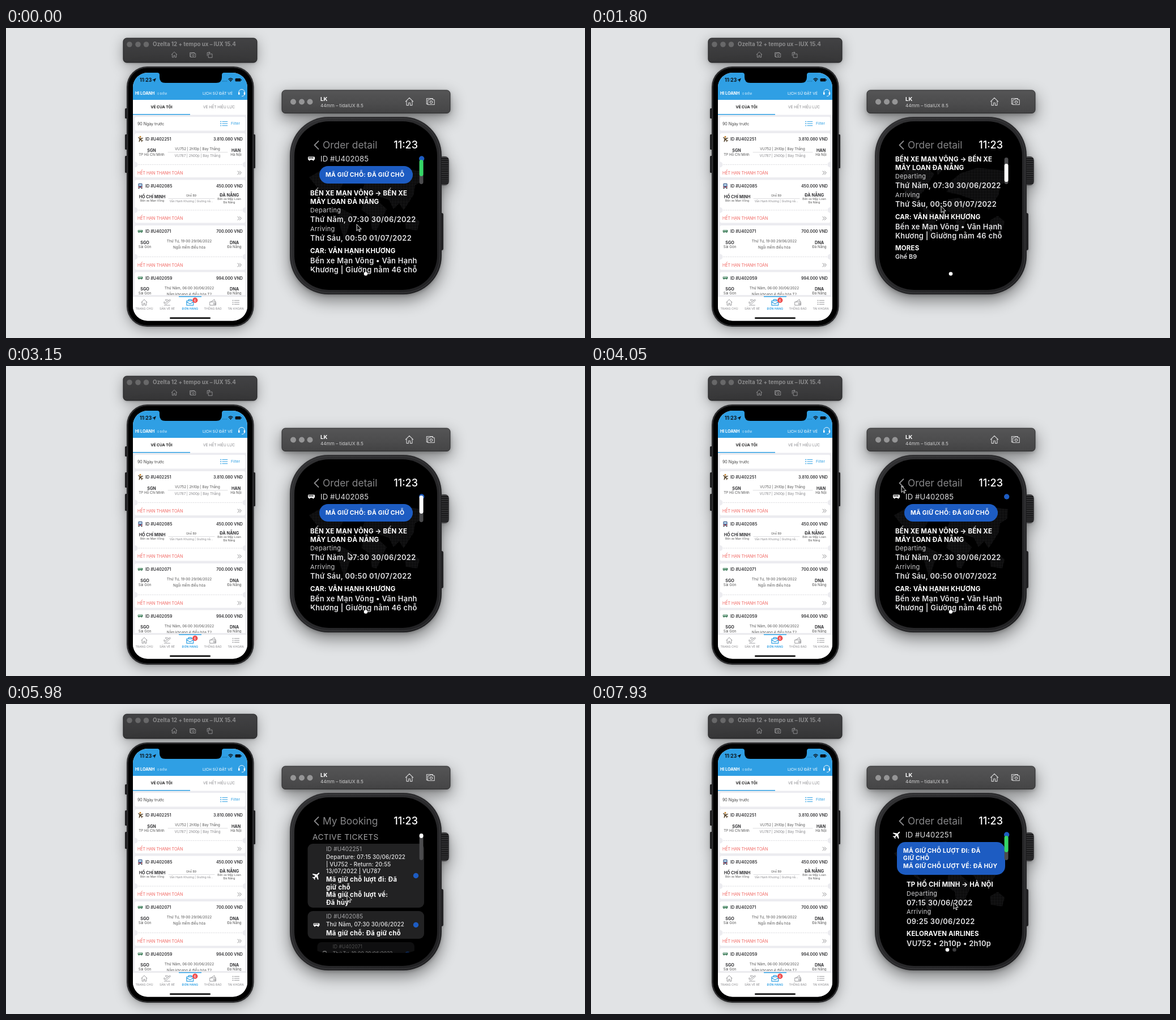
An HTML page that plays this animation: 1022x548 px, repeating every 8 s.

```html
<!DOCTYPE html>
<html lang="vi">
<head>
<meta charset="utf-8">
<title>Booking on phone and watch</title>
<style>
html, body { margin: 0; width: 100%; height: 100%; overflow: hidden; background: #e1e3e5; }
svg { display: block; width: 1022px; height: 548px; font-family: Inter, Roboto, sans-serif; }
.shade { filter: drop-shadow(0 1px 2px rgba(0, 0, 0, .18)) drop-shadow(0 5px 11px rgba(0, 0, 0, .32)); }
.deep { filter: drop-shadow(0 2px 3px rgba(0, 0, 0, .2)) drop-shadow(0 10px 14px rgba(0, 0, 0, .46)); }
.line { fill: none; stroke-linecap: round; stroke-linejoin: round; }
</style>
</head>
<body>
<svg id="stage" viewBox="0 0 1022 548"></svg>
<script>
const BLUE = '#2d9fe3', DEEP = '#1d5cc2', RED = '#f0615c', GREY = '#88888c', INK = '#333336', BG = '#ececf0';

// y is the middle of the capital letters
const text = (s, x, y, size, fill = '#fff', weight = 400, anchor = 'start', gap = 0) =>
  `<text x="${x}" y="${y + size * .36}" font-size="${size}" fill="${fill}" font-weight="${weight}" text-anchor="${anchor}" letter-spacing="${gap}">${s}</text>`;
const mid = (s, x, y, size, fill, weight) => text(s, x, y, size, fill, weight, 'middle');
const end = (s, x, y, size, fill, weight) => text(s, x, y, size, fill, weight, 'end');
const rect = (x, y, w, h, r, fill, more = '') =>
  `<rect x="${x}" y="${y}" width="${w}" height="${h}" rx="${r}" fill="${fill}" ${more}/>`;
const dot = (x, y, r, fill) => `<circle cx="${x}" cy="${y}" r="${r}" fill="${fill}"/>`;
const path = (d, fill) => `<path d="${d}" fill="${fill}"/>`;
const line = (d, stroke, w = 1, more = '') => `<path class="line" d="${d}" stroke="${stroke}" stroke-width="${w}" ${more}/>`;
const at = (x, y, s, inner, turn = 0) => `<g transform="translate(${x} ${y}) rotate(${turn}) scale(${s})">${inner}</g>`;
const group = (id, inner) => `<g id="${id}">${inner}</g>`;

const plane = c => path('M0-7C.8-7 1.1-6 1.1-5V-2L7 2V3.5L1.1 1.8V5L3 6.5V7.5L0 6.8-3 7.5V6.5L-1.1 5V1.8L-7 3.5V2L-1.1-2V-5C-1.1-6-.8-7 0-7Z', c);
const bus = (c, hole) => rect(-6, -3.4, 12, 5.4, 1.2, c) + [-4.8, -1.8, 1.2].map(x => rect(x, -2.3, 2.3, 1.8, .3, hole)).join('') +
  dot(-3.3, 2.2, 1.3, c) + dot(3.3, 2.2, 1.3, c);
const train = (c, hole) => rect(-4, -6, 8, 9, 2, c) + rect(-2.8, -4, 5.6, 3.4, .6, hole) +
  dot(-2, 1.2, .8, hole) + dot(2, 1.2, .8, hole) + line('M-2.5 3.5L-4.5 6M2.5 3.5L4.5 6M-3 4.8H3', c, 1.1);
const home = c => line('M-6 0L0-6 6 0M-4.5-1V6H-1.3V2H1.3V6H4.5V-1', c, 1);
const shots = c => line('M-4 4H-6V-5H4V-3M-4-3H-1L0-4.3H3L4-3H6.5V5H-4Z', c, 1) +
  `<circle cx="1.3" cy="1" r="2" fill="none" stroke="${c}"/>`;
const list = (c, w) => line('M-3-4H7M-3 0H7M-3 4H7', c, w) + [-4, 0, 4].map(y => dot(-6, y, 1, c)).join('');

// ---------- phone ----------
function ticket(top, h, id, price, icon, cut) {
  const y = top + 10.5;
  let s = rect(227.5, top, 195, h, 3, '#fff') + at(237, y, .72, icon) +
    text('ID #' + id, 246, y, 7.3, INK, 600) + end(price + ' VND', 418, y, 7.1, INK, 600);
  if (cut) s += line(`M234 ${cut}H417`, '#d8d8dc', .8, 'stroke-dasharray="2 2"') +
    dot(227.5, cut, 5, BG) + dot(422.5, cut, 5, BG) +
    text('HẾT HẠN THANH TOÁN', 232, cut + 14.7, 7.05, RED) +
    line(`M409 ${cut + 11.5}l3 3-3 3m3.3-6l3 3-3 3`, '#66666a', .8);
  return s;
}
const place = (code, name, x, y, size = 6.2) => mid(code, x, y, 7.2, INK, 700) + mid(name, x, y + 7.6, size, '#555');
const note = (s, x, y, size = 6.2, fill = '#555') => mid(s, x, y, size, fill);
const van = bus('#3d7a58', '#d6eedf');
const coach = rect(-5, -6, 10, 11, 2, '#3f5f8c') + rect(-3.5, -4, 7, 4, 1, '#bcd7ef') +
  dot(-3, 3, 1.5, RED) + dot(3, 3, 1.5, RED) + rect(-5, 5, 3, 2, .5, INK) + rect(2, 5, 3, 2, .5, INK);

const tickets =
  ticket(186, 78, 'U402251', '3.810.080', at(0, 0, 1, plane('#5b4a33') + dot(4, -4, 2.2, '#c98b3a'), -45), 241.5) +
  place('SGN', 'TP Hồ Chí Minh', 257, 216.3) + place('HAN', 'Hà Nội', 406, 216.3) +
  note('VU752 | 2h10p | Bay Thẳng', 338, 214) + note('VU787 | 2h00p | Bay Thẳng', 338, 225.5, 6.2, GREY) +
  line('M286 219.7H391', '#d5d5d9', .8) +
  ticket(268.5, 76, 'U402085', '450.000', coach, 322) +
  place('HỒ CHÍ MINH', 'Bến xe Mạn Vông', 258, 298, 5.1) + place('ĐÀ NẴNG', 'Bến xe Mây Loan', 394, 295, 5.1) +
  note('Đà Nẵng', 394, 308.5, 5.1) + note('Ghế B9', 327, 296.5, 5.2) +
  note('Vân Hạnh Khương | Giường nằ...', 327, 306.5, 5.1, GREY) + line('M287 301.5H368', '#d5d5d9', .8) +
  ticket(349, 78.5, 'U402071', '700.000', van, 404.5) +
  place('SGO', 'Sài Gòn', 245, 379) + place('DNA', 'Đà Nẵng', 403, 379) +
  note('Thứ Tư, 19:00 29/06/2022', 323.5, 377, 6.4) + note('Ngồi mềm điều hòa', 323.5, 388) +
  ticket(431.5, 60, 'U402059', '994.000', van) +
  place('SGO', 'Sài Gòn', 245, 461.5) + place('DNA', 'Đà Nẵng', 403, 461.5) +
  note('Thứ Năm, 06:00 30/06/2022', 323.5, 459.5, 6.4) + note('Nằm khoang 4 điều hòa T2', 323.5, 470.5);

const tabs = [
  ['TRANG CHỦ', home(GREY)],
  ['SĂN VÉ RẺ', line('M-6 6H6M-6-1L-3 1 6-6 7-4-2 4-6 2ZM0-2L-4-5-2-6 4-4', GREY, .9)],
  ['ĐƠN HÀNG', line('M-7-3H7V6H-7ZM-3-3V-6H3V-3M-7-1L0 3 7-1', BLUE, 1.4)],
  ['THÔNG BÁO', line('M-6-1H6V6H-6ZM-4-1L3-6 5-1M2 2H6V4H2Z', GREY, 1)],
  ['TÀI KHOẢN', list(GREY, 1)]
].map(([name, icon], i) => at(244 + i * 40.4, 485, .85, icon) +
  mid(name, 244 + i * 40.4, 496.5, 5.2, i == 2 ? BLUE : GREY, i == 2 ? 600 : 400)).join('');

const phone =
  `<g class="shade">${rect(207, 18, 236, 43, 6, 'url(#bar)', 'stroke="#1d1d1e"')}</g>` +
  [218, 233, 247.5].map(x => dot(x, 29, 4.8, '#686869')).join('') +
  text('Ozelta 12 + tempo ux – lUX 15.4', 259, 28.7, 9.7, '#8b8b8c', 700) +
  at(297, 47, .8, home('#a0a0a1')) + at(329.5, 47.5, .8, shots('#a0a0a1')) +
  at(360, 47.5, .8, line('M-3-2H5V6H-3ZM-6 2V-5H0M-2-7L0-5-2-3', '#a0a0a1', 1)) +
  `<g class="shade">${[[142, 18], [188, 27], [226, 30]].map(([y, h]) => rect(210, y, 6, h, 1.5, '#1e1e20')).join('') +
    rect(434, 188, 6, 60, 1.5, '#1e1e20') + rect(213, 68, 224.5, 460, 36, '#262628')}</g>` +
  rect(215, 70, 220.5, 456, 34, '#000', 'stroke="#3f3f42" stroke-width=".8"') +
  `<g clip-path="url(#phoneClip)">` +
    rect(224, 79, 202, 440, 0, BG) + rect(224, 79, 202, 48, 0, '#2f9fe4') +
    path('M267 79Q271 79 271 83V87Q271 97 281 97H371Q381 97 381 87V83Q381 79 385 79Z', '#000') +
    text('11:23', 236, 92, 8.6, '#0b1015', 700) + path('M258 92L265 88.5 262 96 261.3 92.7Z', '#0b1015') +
    [382, 384.5, 387, 389.5].map(x => dot(x, 94, .7, '#17669a')).join('') +
    line('M393 90.5Q396.5 87.5 400 90.5M394.5 92.3Q396.5 90.5 398.5 92.3', '#0b1015', 1.4) + dot(396.5, 94, 1, '#0b1015') +
    rect(404.5, 89, 10, 5.5, 1.5, '#0b1015') + rect(415, 90.7, 1, 2, .5, '#0b1015') +
    text('HI LOANH', 228, 115.5, 7.2, '#fff', 700) + text('0 ĐIỂM', 267, 116, 5, '#d9effc') +
    text('LỊCH SỬ ĐẶT VÉ', 347, 115.3, 6.8) +
    line('M411 115V113A5 4.5 0 0 1 421 113V117Q421 120.5 416.5 120.5', '#fff', .9) +
    rect(410, 113.5, 2.5, 4.5, 1, '#fff') + rect(419.7, 113.5, 2.5, 4.5, 1, '#fff') +
    rect(224, 127, 202, 26.5, 0, '#fff') + rect(224, 152, 101, 1.5, 0, BLUE) +
    mid('VÉ CỦA TÔI', 274.5, 140, 6.7, '#222', 700) + mid('VÉ HẾT HIỆU LỰC', 376, 140, 6.6, GREY) +
    rect(227.5, 157, 195, 24.5, 3, '#fff') + text('90 Ngày trước', 232, 169, 7, '#444') +
    at(384.5, 169, .9, list(BLUE, 1.1)) + text('Filter', 397, 169, 6.8, BLUE) +
    `<g clip-path="url(#ticketClip)">${tickets}</g>` +
    rect(224, 474, 202, 45, 0, '#fff') + line('M224 474.5H426', '#dedee2', .7) + rect(305, 474, 40, 1.5, 0, BLUE) + tabs +
    dot(333.7, 481.3, 4.7, '#ef4d4d') + mid('6', 333.7, 481.3, 6.2, '#fff') + rect(289, 511.5, 72, 2.6, 1.3, '#000') +
  `</g>`;

// ---------- watch ----------
const ridges = Array.from({ length: 14 }, (_, i) => line(`M769 ${231 + i * 3.3}H780`, '#0c0c0d', 1.5)).join('');
const watch =
  `<g class="deep">${rect(487, 110, 297, 40.5, 6, 'url(#bar2)', 'stroke="#2b2b2c"')}</g>` +
  [507, 522, 536.5].map(x => dot(x, 130.5, 5, '#959596')).join('') +
  text('LK', 555, 125.5, 9.6, '#fff', 700) + text('44mm – tidalUX 8.5', 555, 136.7, 8.2, '#d0d0d1') +
  at(712, 130, 1.1, home('#d4d4d5')) + at(749, 130, 1.1, shots('#d4d4d5')) +
  `<g class="deep">${rect(764, 227, 18, 51, 7, '#3a3a3c') + rect(764, 327, 8, 66, 3, '#222224')}
    ${rect(501, 157, 268, 314, 68, 'url(#case)')}</g>` + ridges +
  rect(504, 160, 262, 308, 65, 'none', 'stroke="#454547" stroke-width=".8"') + rect(509, 165, 252, 298, 61, '#000');

function row(h, id, icon, plain, bold, boldY) {
  const c = h / 2;
  return `<g class="row">${rect(-102.5, 0, 205.5, h, 9, '#222223') + at(-87, c, 1, icon) + dot(88.5, c, 4.7, DEEP)}` +
    text('ID #' + id, -70, 9.3, 10, '#a9a9ab', 400, 'start', .15) +
    plain.map((s, i) => text(s, -70, 23.8 + i * 12.2, 9.9, '#e6e6e7', 500, 'start', .1)).join('') +
    bold.map((s, i) => text(s, -70, boldY + i * 13.5, 11.2, '#fff', 700, 'start', .33)).join('') + '</g>';
}
const short = (id, icon, when) => row(49, id, icon, [when], ['Mã giữ chỗ: Đã giữ chỗ'], 39);
const tops = [247, 366, 421, 476, 531];
const rows =
  row(113, 'U402251', at(0, 0, 1, plane('#fff'), 45), ['Departure: 07:15 30/06/2022', '| VU752 - Return: 20:55', '13/07/2022 | VU787'],
    ['Mã giữ chỗ lượt đi: Đã', 'giữ chỗ', 'Mã giữ chỗ lượt về:', 'Đã hủy'], 63) +
  short('U402085', at(0, 0, .9, bus('#fff', '#222')), 'Thứ Năm, 07:30 30/06/2022') +
  short('U402071', train('#fff', '#222'), 'Thứ Tư, 19:00 29/06/2022') +
  short('U402059', train('#fff', '#222'), 'Thứ Năm, 06:00 30/06/2022') +
  short('401100', train('#fff', '#222'), 'Thứ Ba, 06:00 14/06/2022');

const head = (s, x, y) => text(s, x, y, 11.5, '#fff', 700, 'start', .15);
const label = (s, x, y) => text(s, x, y, 11, '#cfcfd1', 400, 'start', .35);
const fact = (s, x, y) => text(s, x, y, 12.9, '#e4e4e6', 600, 'start', .3);
const pillText = (s, x, y) => text(s, x, y, 10.5, '#fff', 700, 'start', .25);
const trip = id => text('ID #' + id, 555, 231, 13.2, '#dcdcde', 400, 'start', .1) + dot(733.7, 231, 4.7, DEEP);

const busTrip = at(539, 231, 1, bus('#fff', '#000')) + trip('U402085') +
  rect(553, 244, 165, 31, 15.5, DEEP) + pillText('MÃ GIỮ CHỖ: ĐÃ GIỮ CHỖ', 564, 259.5) +
  head('BẾN XE MẠN VÔNG → BẾN XE', 537, 291.5) + head('MÂY LOAN ĐÀ NẴNG', 537, 307) +
  label('Departing', 537, 322.5) + fact('Thứ Năm, 07:30 30/06/2022', 537, 338.5) +
  label('Arriving', 537, 355) + fact('Thứ Sáu, 00:50 01/07/2022', 537, 371.5) +
  head('CAR: VÂN HẠNH KHƯƠNG', 537, 393.5) +
  fact('Bến xe Mạn Vông • Vân Hạnh', 537, 411) + fact('Khương | Giường nằm 46 chỗ', 537, 427.5) +
  head('MORES', 537, 448.5) + text('Ghế B9', 537, 464, 10.9, '#e4e4e6', 600);

const flightTrip = at(540, 231, 1, plane('#fff'), 45) + trip('U402251') +
  rect(540, 244, 191, 58, 15, DEEP) + ['MÃ GIỮ CHỖ LƯỢT ĐI: ĐÃ', 'GIỮ CHỖ', 'MÃ GIỮ CHỖ LƯỢT VỀ: ĐÃ HỦY']
    .map((s, i) => pillText(s, 551, 259 + i * 13.6)).join('') +
  head('TP HỒ CHÍ MINH → HÀ NỘI', 557, 318.5) +
  label('Departing', 557, 335) + fact('07:15 30/06/2022', 557, 351) +
  label('Arriving', 557, 367.5) + fact('09:25 30/06/2022', 557, 384) +
  head('KELORAVEN AIRLINES', 557, 406) + fact('VU752 • 2h10p • 2h10p', 557, 423.5);

const land = 'M535 264L560 249 592 247 606 258 586 290 574 300 588 317 570 304 554 288Z' +
  'M608 245L628 243 612 260Z M586 316L612 330 606 348 597 375 588 345Z' +
  'M630 303L650 300 672 320 654 358 646 356 642 332 628 322Z' +
  'M628 290L634 272 652 257 682 247 736 253 735 270 722 278 720 294 702 322 694 310 684 320 676 304 648 294Z' +
  'M704 340L718 332 730 342 726 358 706 355Z';

document.getElementById('stage').innerHTML = `<defs>
  <linearGradient id="bar" x2="0" y2="1"><stop stop-color="#424244"/><stop offset="1" stop-color="#363637"/></linearGradient>
  <linearGradient id="bar2" x2="0" y2="1"><stop stop-color="#555556"/><stop offset="1" stop-color="#454546"/></linearGradient>
  <linearGradient id="case" x2="1" y2="1"><stop stop-color="#313133"/><stop offset="1" stop-color="#202022"/></linearGradient>
  <pattern id="dots" width="2.5" height="2.5" patternUnits="userSpaceOnUse">${dot(1.2, 1.2, .8, '#303032')}</pattern>
  <clipPath id="phoneClip">${rect(224, 79, 202, 438.5, 26, '#000')}</clipPath>
  <clipPath id="ticketClip">${rect(224, 183, 202, 289, 0, '#000')}</clipPath>
  <clipPath id="watchClip"><path d="M526 223H744V400A40 40 0 0 1 704 440H566A40 40 0 0 1 526 400Z"/></clipPath>
</defs>` + phone + watch +
  `<g clip-path="url(#watchClip)">` +
    group('booking', group('caption', text('ACTIVE TICKETS', 541, 235.5, 13.7, '#a2a2a4', 400, 'start', .45)) + rows) +
    group('map', path(land, 'url(#dots)')) + group('busTrip', busTrip) + group('flightTrip', flightTrip) +
  `</g>` +
  group('scrollbar', rect(729.7, 229, 6.8, 47, 3.4, '#4c4c4e', 'id="track"') + rect(729.7, 229, 6.8, 32, 3.4, '#fff', 'id="thumb"')) +
  group('page1', dot(635, 434.5, 3.3, '#fff')) + group('page2', dot(629, 434.5, 3.3, '#fff') + dot(641.5, 434.5, 3.3, '#3c3c3e')) +
  line('M551.5 200L544.5 207 551.5 214', '#8a8a8c', 1.8) +
  group('title1', text('Order detail', 559, 207, 17.4, '#858587')) + group('title2', text('My Booking', 559, 207, 17.4, '#858587')) +
  end('11:23', 727, 207, 18, '#fff', 500) +
  group('cursor', '<path d="M0 0V11.5L2.7 9 4.6 13 6.3 12.2 4.6 8.4H8.2Z" fill="#111" stroke="#fff" stroke-width=".9"/>');

// ---------- motion ----------
const $ = id => document.getElementById(id);
const cards = [...document.querySelectorAll('.row')];
const move = (el, x, y, s = 1) => el.setAttribute('transform', `translate(${x} ${y}) scale(${s})`);
const fade = (id, v) => $(id).setAttribute('opacity', v);
const set = (id, attrs) => { for (const k in attrs) $(id).setAttribute(k, attrs[k]); };

const pointer = [[0, 619, 347], [150, 619, 345], [450, 619, 322], [900, 620, 301], [1500, 620, 300], [2100, 616, 330], [2550, 614, 354],
  [2850, 612, 350], [3300, 600, 320], [3750, 562, 236], [4050, 548, 212], [4500, 548, 212], [5100, 587, 267], [5400, 592, 285],
  [5830, 602, 335], [5980, 602, 338], [6430, 648, 292], [7480, 648, 292], [7630, 645, 315], [7930, 640, 351]];
const detailScroll = [[150, 0], [300, 10], [600, 55], [750, 72], [900, 79], [1500, 79], [1800, 60], [2100, 22], [2400, -8], [2550, -10], [2850, 0]];
const listScroll = [[5250, 136], [5400, 128], [5550, 98], [5700, 48], [5830, 12], [5980, 0]];
const listShown = [[4350, 0], [4800, 1], [6430, 1], [6880, 0]];
const busSlide = [[4350, 0], [4500, 30], [4650, 120], [4800, 220]];
const flightSlide = [[6430, 220], [6580, 180], [6730, 85], [6880, 20], [7030, 0]];

function key(frames, t) {
  const i = frames.findIndex(f => f[0] > t);
  if (i < 1) return (i ? frames[frames.length - 1] : frames[0]).slice(1);
  const a = frames[i - 1], b = frames[i], k = (t - a[0]) / (b[0] - a[0]);
  return a.slice(1).map((v, j) => v + (b[j + 1] - v) * k);
}

function draw(time) {
  // the picture advances in 150 ms steps, with one shorter step before 5830
  const now = time % 8000, base = now < 5830 ? 0 : 5830;
  const t = base + Math.floor((now - base) / 150) * 150;
  const [scroll] = key(detailScroll, t), [down] = key(listScroll, t), [shown] = key(listShown, t);

  move($('cursor'), ...key(pointer, t));
  move($('busTrip'), key(busSlide, t)[0], -scroll);
  move($('flightTrip'), key(flightSlide, t)[0], 0);
  move($('caption'), 0, -down);
  cards.forEach((card, i) => {
    const top = tops[i] - down, shrink = Math.min(.3, Math.max(0, top - 378) ** 2 * 9e-5);
    move(card, 635, top, 1 - shrink);
    card.setAttribute('opacity', 1 - 3.2 * shrink);
  });

  fade('booking', shown);
  fade('title2', shown);
  fade('title1', 1 - shown);
  fade('map', 1 - shown);
  fade('busTrip', t < 4800 ? 1 : 0);
  fade('flightTrip', t >= 6580 ? 1 : 0);
  fade('page1', t < 4650 ? 1 : 0);
  fade('page2', t >= 6880 ? 1 : 0);

  const inList = t >= 5400 && t < 6580, green = t < 300 || t >= 7030;
  fade('scrollbar', t < 3450 || inList || green ? 1 : 0);
  set('track', green ? { y: 233, height: 43 } : { y: 229, height: 47 });
  set('thumb', green ? { y: 233, height: 29, fill: '#35d667' }
    : inList ? { y: 229 + down * .11, height: 8, fill: '#fff' }
    : { y: 229 + Math.max(0, scroll) * .185, height: 32 + Math.min(0, scroll) * .2, fill: '#fff' });
}

const start = performance.now();
(function loop() {
  draw(performance.now() - start);
  requestAnimationFrame(loop);
})();
</script>
</body>
</html>
```
